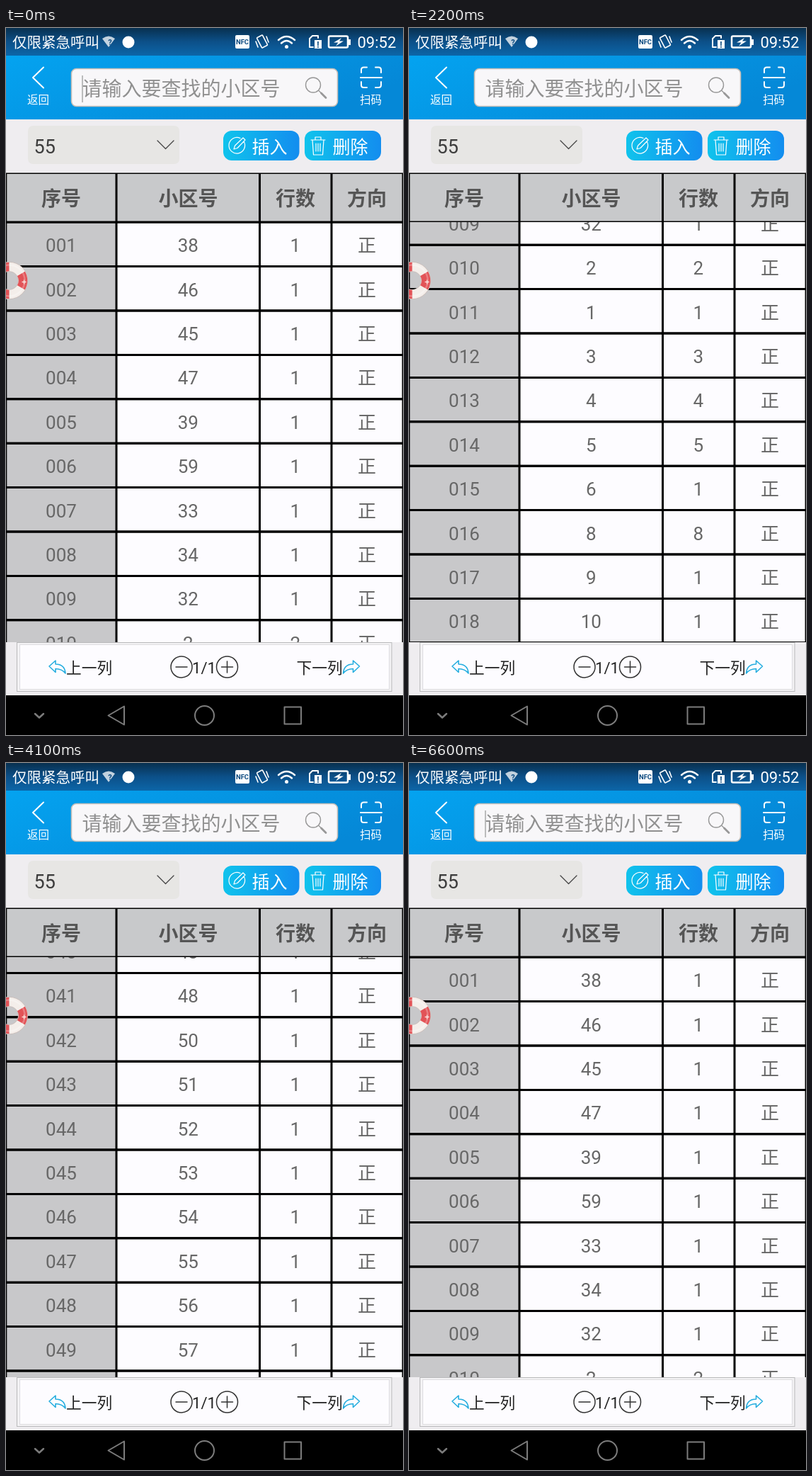
These frames come from a looping animation (561x998 px, 6700 ms). An HTML page:

```html
<!DOCTYPE html>
<html lang="zh-CN">
<head>
<meta charset="utf-8">
<title>小区列表</title>
<style>
  html, body { margin: 0; width: 100%; height: 100%; overflow: hidden; background: #efedf0; }
  svg { display: block; width: 561px; height: 998px; }
  text { font-family: Roboto, 'Noto Sans CJK SC', 'Noto Sans CJK', 'Noto Sans CJK JP', sans-serif; }
  .mid { text-anchor: middle; }
  .badge { text-anchor: middle; font-weight: 700; fill: #0b4a80; }
  .line { fill: none; stroke-linecap: round; stroke-linejoin: round; }
  .white { stroke: #fff; }
  #rows text { font-size: 26px; fill: #676767; text-anchor: middle; }
  #head text { font-size: 28px; font-weight: 700; fill: #555; text-anchor: middle; }
  #nav { stroke: #7c7c7c; stroke-width: 2; }
</style>
</head>
<body>
<svg viewBox="0 0 561 998">
  <defs>
    <linearGradient id="status" x2="0" y2="1">
      <stop stop-color="#08304f"/><stop offset=".5" stop-color="#0c5089"/><stop offset="1" stop-color="#0c66a8"/>
    </linearGradient>
    <linearGradient id="bar" x2="1" y2=".4">
      <stop stop-color="#04a3f0"/><stop offset="1" stop-color="#0588d7"/>
    </linearGradient>
    <linearGradient id="button">
      <stop stop-color="#10c3ec"/><stop offset="1" stop-color="#138def"/>
    </linearGradient>
    <clipPath id="view"><path d="M0 273H561V867H0z"/></clipPath>
  </defs>
  <path fill="#efedf0" d="M0 0H561V998H0z"/>

  <!-- status bar -->
  <path fill="url(#status)" d="M0 0H561V39H0z"/>
  <g fill="#fff">
    <text x="9" y="28" font-size="20.5">仅限紧急呼叫</text>
    <path d="M136 15Q145 8 154 15L145 27z" opacity=".75"/>
    <text class="badge" x="147" y="24" font-size="11">?</text>
    <circle cx="173" cy="20" r="8.5"/>
    <rect x="324" y="10" width="20" height="19" rx="2"/>
    <text class="badge" x="334" y="23.2" font-size="9.5">NFC</text>
    <circle cx="396.5" cy="26.5" r="2.5"/>
    <path d="M436 17H446V29H436z"/>
    <text class="badge" x="441" y="27.5" font-size="12">!</text>
    <path d="M484 16H487V24H484z"/>
    <path d="M474 14L463 20.500H469.500L466 25.500L477 18.500H471z"/>
    <text x="496.5" y="28" font-size="22">09:52</text>
  </g>
  <g class="line white" stroke-width="2">
    <path stroke-width="2.5" d="M385 17Q396.500 7 408 17M389 21.500Q396.500 14.500 404 21.500"/>
    <rect x="456" y="11.500" width="27" height="16" rx="2" stroke-width="2.5"/>
    <path d="M441 14V11H433L429 15V27H434"/>
    <g stroke-width="1.6">
      <rect x="357.5" y="11" width="9" height="16" rx="1" transform="rotate(-28 362 19)"/>
      <path d="M353 19L356 27M371 20L368 12"/>
    </g>
  </g>

  <!-- title bar -->
  <path fill="url(#bar)" d="M0 39H561V129H0z"/>
  <g class="line white" stroke-width="2">
    <path d="M53 55.500L38 70L53 84.500"/>
    <path d="M502 63V59Q502 55.500 505.500 55.500H510M522 55.500H526.500Q530 55.500 530 59V63M530 76V80.500Q530 84 526.500 84H522M510 84H505.500Q502 84 502 80.500V76M501 70H531"/>
  </g>
  <g fill="#fff" font-size="15.5" class="mid">
    <text x="45.5" y="107">返回</text>
    <text x="515.5" y="107">扫码</text>
  </g>
  <rect x="92.5" y="57.5" width="376" height="53" rx="7" fill="#f8f7f9" stroke="#c5bfb9" stroke-width="1.6"/>
  <text x="107.5" y="96" font-size="28" fill="#909090">请输入要查找的小区号</text>
  <path id="cursor" d="M108 67V105" stroke="#a9a9a9" stroke-width="1.5"/>
  <g class="line" stroke="#989898" stroke-width="1.4">
    <circle cx="434" cy="80.5" r="10.5"/>
    <path d="M442 88.500L445 91.500"/>
    <path d="M445.500 92L452 98.500" stroke-width="2.8"/>
  </g>

  <!-- tools -->
  <rect x="31" y="138" width="214" height="54" rx="7" fill="#e7e6e4"/>
  <text x="39.5" y="176.500" font-size="27" fill="#3d3d3d">55</text>
  <path class="line" d="M214 159L225.500 170.500L237 159" stroke="#444" stroke-width="1.3"/>
  <g fill="url(#button)">
    <rect x="307" y="145" width="107.5" height="42" rx="12"/>
    <rect x="422" y="145" width="108" height="42" rx="12"/>
  </g>
  <g fill="#fff" font-size="25" font-weight="500">
    <text x="347.5" y="176.5">插入</text>
    <text x="461.5" y="176.5">删除</text>
  </g>
  <g class="line white" stroke-width="1.2">
    <path d="M336 160A11.300 11.300 0 1 1 331 155.500M322 171L323.500 166L335 155L338 158L327 169.500z"/>
    <path d="M431 158H451M437 158V154H445V158M433 158L434.500 179H447.500L449 158M438 163V174M441 163V174M444 163V174"/>
  </g>

  <!-- table -->
  <g clip-path="url(#view)">
    <path fill="#fdfcff" d="M0 273H561V867H0z"/>
    <path fill="#c8c8ca" d="M0 273H156V867H0z"/>
    <g id="rows"></g>
  </g>
  <g id="head">
    <path fill="#c8c9cb" d="M0 205H561V273H0z"/>
    <path d="M0 205.300H561M0 273.300H561" stroke="#000" stroke-width="1.6"/>
    <text x="78" y="251">序号</text>
    <text x="257.5" y="251">小区号</text>
    <text x="409" y="251">行数</text>
    <text x="510" y="251">方向</text>
  </g>
  <path d="M156 205V867M358.500 205V867M460 205V867" stroke="#000" stroke-width="3"/>
  <path d="M.600 205V867M560.300 205V867" stroke="#000" stroke-width="1.4"/>

  <!-- pager -->
  <rect x="15.5" y="867.5" width="529.5" height="69" fill="#f3f2f4" stroke="#b9b9bb"/>
  <rect x="19.5" y="870.5" width="522" height="63" fill="#fdfcff" stroke="#dedde0"/>
  <g fill="#222" font-size="21.7">
    <text x="85" y="911" font-weight="500">上一列</text>
    <text x="410.5" y="911" font-weight="500">下一列</text>
    <text class="mid" x="280" y="910.5" font-size="22">1/1</text>
  </g>
  <g class="line" stroke="#333" stroke-width="1.5">
    <circle cx="248" cy="902" r="15"/><circle cx="312.5" cy="902" r="15"/>
    <path d="M240 902H256M304.500 902H320.500M312.500 894V910"/>
  </g>
  <g class="line" stroke="#25addf" stroke-width="1.6">
    <path id="reply" d="M61 901L70 893V898Q83 898 84 911Q79 904.500 70 904.500V909.500z"/>
    <use href="#reply" transform="matrix(-1 0 0 1 560.5 0)"/>
  </g>

  <!-- navigation -->
  <path d="M0 942H561V998H0z"/>
  <g id="nav" class="line">
    <path d="M41 968L47 973.500L53 968" stroke-width="2.5"/>
    <path d="M144.500 970.500L167 957.500V983.500z"/>
    <circle cx="280.5" cy="970.5" r="13.5"/>
    <path d="M393.500 958.500H417V982.500H393.500z"/>
  </g>

  <!-- life ring -->
  <g fill="none" transform="translate(4.5 356.5)">
    <circle r="19.5" stroke="#c9bcb8" stroke-width="14"/>
    <circle r="19.5" stroke="#f4eeea" stroke-width="12.5"/>
    <circle r="19.5" stroke="#e25357" stroke-width="12.5" pathLength="6" stroke-dasharray="1" transform="rotate(-30)"/>
    <circle r="22" stroke="#fff" stroke-width="2.5" opacity=".25"/>
    <path d="M18 2H24M21 -1V5" stroke="#fbe3e0" stroke-width="1.3"/>
  </g>

  <g id="touch">
    <circle r="18.5" fill="#9aabc0" opacity=".3"/>
    <circle r="16.5" fill="#ebecef" fill-opacity=".9" stroke="#b3c0d0" stroke-width="1.5"/>
  </g>
</svg>
<script>
const STEP = 100, LOOP = 6700, ROW = 62.4, TOP = 274.2;
const $ = id => document.getElementById(id);
const range = (a, b) => Array.from({ length: b - a + 1 }, (_, i) => a + i);

const plots = [38, 46, 45, 47, 39, 59, 33, 34, 32, 2, 1, 3, 4, 5, 6, 8, 9,
  ...range(10, 17), ...range(19, 22), ...range(24, 30), ...range(40, 43), 48, ...range(50, 58)];
const counts = { 2: 2, 3: 3, 4: 4, 5: 5, 8: 8 };

$('rows').innerHTML = plots.map((plot, i) => {
  const y = TOP + i * ROW, base = y + 42;
  const cell = (x, value) => `<text x="${x}" y="${base}">${value}</text>`;
  return `<path d="M0 ${y}H561M0 ${y + ROW}H561" stroke="#000" stroke-width="3"/>` +
    cell(78, String(i + 1).padStart(3, '0')) + cell(257.3, plot) +
    cell(408.7, counts[plot] || 1) + cell(510, '正');
}).join('');

// [time, scroll offset, deceleration power on the way there]
const scroll = [[0, 0, 1], [600, 0, 1], [800, 130, 1], [1400, 281, 2], [1500, 281, 1],
  [1700, 404, 1], [2200, 529.6, 2], [2300, 529.6, 1], [2500, 730, 1], [3200, 1829, 1.5],
  [3300, 1829, 1], [3500, 2032, 1], [4400, 2529, 2], [4600, 2529, 1], [4800, 2431, 1],
  [5900, 0, 1.447], [LOOP, 0, 1]];

// [start, end, x0, y0, x1, y1]
const swipes = [[600, 800, 106, 700, 110, 570], [1500, 1700, 109, 653, 106, 530],
  [2300, 2500, 92, 680, 96, 480], [3300, 3500, 87, 640, 90, 437], [4600, 4700, 83, 540, 81, 638]];

function offsetAt(t) {
  const i = scroll.findIndex(k => k[0] > t);
  const [t0, s0] = scroll[i - 1], [t1, s1, power] = scroll[i];
  return s0 + (s1 - s0) * (1 - (1 - (t - t0) / (t1 - t0)) ** power);
}

function drawTouch(t) {
  const swipe = swipes.find(([a, b]) => t >= a && t <= b + STEP);
  $('touch').setAttribute('opacity', swipe ? (t > swipe[1] ? .12 : 1) : 0);
  if (!swipe) return;
  const [a, b, x0, y0, x1, y1] = swipe;
  const u = Math.min(1, (t - a) / (b - a));
  $('touch').setAttribute('transform', `translate(${x0 + (x1 - x0) * u} ${y0 + (y1 - y0) * u})`);
}

const start = performance.now();
function draw() {
  const t = Math.floor((performance.now() - start) % LOOP / STEP) * STEP;
  $('rows').setAttribute('transform', `translate(0 ${-offsetAt(t)})`);
  $('cursor').setAttribute('opacity', (t + 400) % 1000 < 500 ? 1 : 0);
  drawTouch(t);
  requestAnimationFrame(draw);
}
draw();
</script>
</body>
</html>
```
